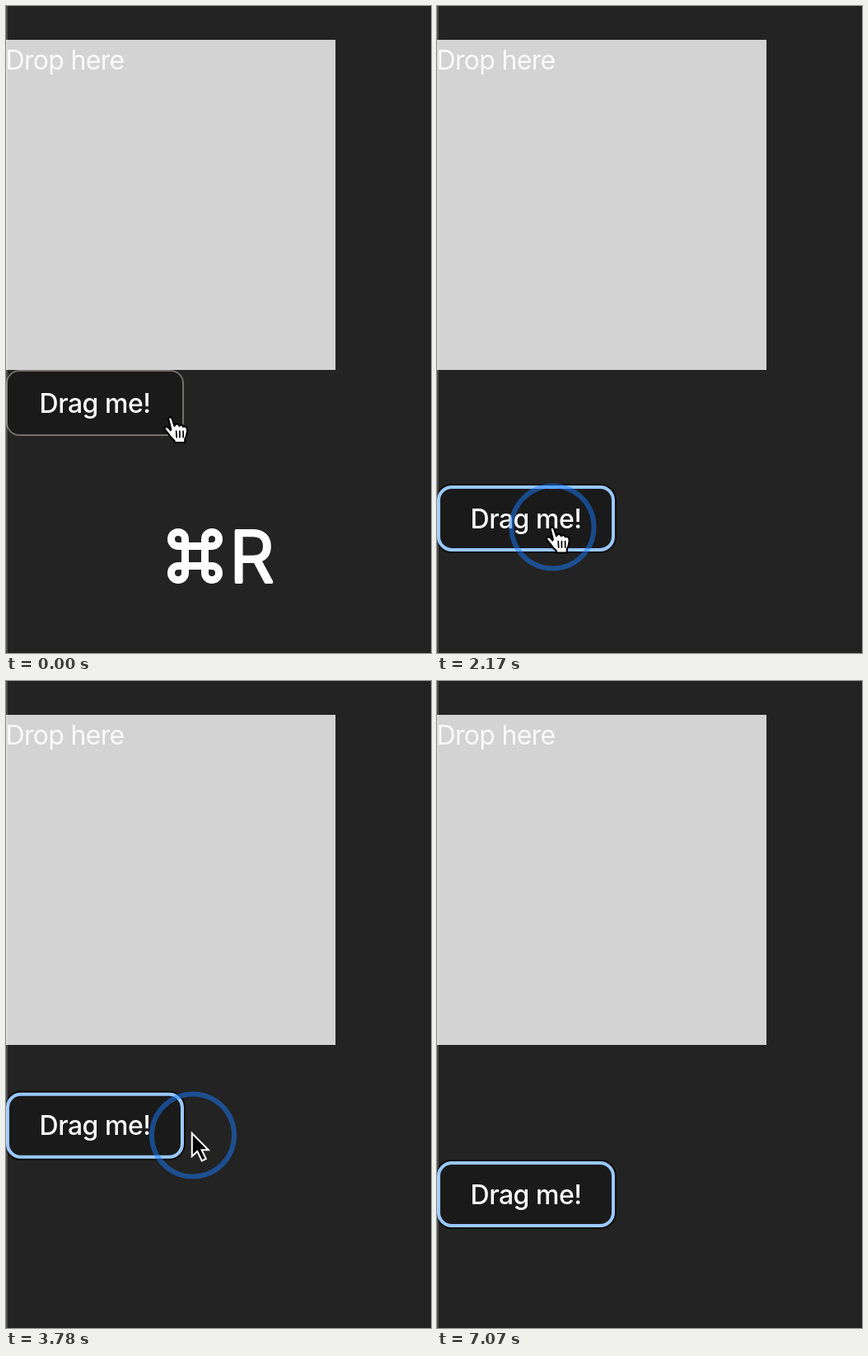
Recreate the animation shown at these times as an HTML page. Size 516x784 px, loop 7.21 s.

```html
<!DOCTYPE html>
<html lang="en">
<head>
<meta charset="utf-8">
<title>Drag and drop</title>
<style>
  html, body { margin: 0; height: 100%; overflow: hidden; background: #232323; }
  svg { display: block; }
  text { font-family: Inter, sans-serif; font-size: 32px; fill: #fff; }
</style>
</head>
<body>
<svg width="516" height="784" fill="none">
  <rect id="zone" y="41" width="400" height="400"/>
  <text x="-.4" y="77" letter-spacing="-.7" fill-opacity=".87">Drop here</text>

  <g id="button">
    <rect width="216" height="80" rx="16" fill="#1a1a1a"/>
    <rect id="border" x="1" y="1" width="214" height="78" rx="15" stroke="#74706b" stroke-width="2"/>
    <g id="focus">
      <rect x="-1" y="-1" width="218" height="82" rx="19" stroke="#0c0c0c" stroke-width="2"/>
      <rect x="2" y="2" width="212" height="76" rx="16" stroke="#99c8ff" stroke-width="4"/>
    </g>
    <text x="108" y="51.7" text-anchor="middle" letter-spacing="-.5" font-weight="500">Drag me!</text>
  </g>
  <rect width="2" height="784" fill="#fff" fill-opacity=".2"/>

  <g id="keys" stroke="#fff" stroke-linejoin="round">
    <path transform="translate(229.5 666.5)" stroke-width="9"
      d="M-12-12H-20.5A8.500 8.500 0 1 1-12-20.500V20.500A8.500 8.500 0 1 1-20.500 12H20.500A8.500 8.500 0 1 1 12 20.500V-20.500A8.500 8.500 0 1 1 20.500-12Z"/>
    <text x="271.5" y="698" style="font-size:85px" font-weight="300" stroke-width="4">R</text>
  </g>

  <g id="pointer">
    <circle id="ring" r="50" stroke="#187cfe" stroke-opacity=".5" stroke-width="6"/>
    <path id="arrow" d="M-1.200-2.500V25.500L5.300 19.500L10.800 31L15.800 28.500L10.600 17.800H18.800Z"
      fill="#000" stroke="#fff" stroke-width="2"/>
    <g id="hand" transform="translate(.3 .2) scale(1.06)"
      stroke="#000" stroke-linejoin="round" stroke-linecap="round">
      <path fill="#fff" stroke-width="2" d="M-3 2Q-2-1.500 1 1L4 10Q5 7 8 8Q9 8.500 9.500 10Q11 8 13.500 9.500L14 11Q16 10 18 12
        Q19 13 18.500 17Q18 22 16 25V29H4V27Q0 24-3 19L-7 14Q-8 11-5 11Q-3 11-.5 15L0 14Z"/>
      <path stroke-width="1.6" d="M6 16l.5 7M10 16v7M14 16v7"/>
    </g>
  </g>
</svg>
<script>
const LOOP = 7210, STEP = 70, PRESS = 770, RELEASE = 4760, HIDE = 6020;
const REST = 441, GRIP = 50, LAG = 12;

// turning points of the pointer: time, x, y
const path = [
  [0, 200, 498], [PRESS, 196, 491], [1330, 268, 647], [1540, 244.5, 608.5],
  [2170, 140.5, 631.5], [2275, 134, 643], [3010, 305, 481], [3150, 320, 462],
  [3780, 227, 550.5], [4130, 333, 600], [4340, 270, 647], [4480, 218, 642],
  [RELEASE, 194, 632], [LOOP, 194, 632]
];
const el = id => document.getElementById(id);
const clamp = v => Math.max(0, Math.min(1, v));
const show = (id, opacity) => el(id).setAttribute('opacity', opacity);
const move = (id, x, y) => el(id).setAttribute('transform', `translate(${x} ${y})`);

// zero where the pointer turns round, so the curve never overshoots
function slope(i, k) {
  const a = path[i - 1], b = path[i], c = path[i + 1];
  if (!a || !c || (b[k] - a[k]) * (c[k] - b[k]) <= 0) return 0;
  return (c[k] - a[k]) / (c[0] - a[0]);
}

function sample(t, k) {
  const i = path.findIndex(p => p[0] > t) - 1;
  const a = path[i], b = path[i + 1], d = b[0] - a[0], u = (t - a[0]) / d, v = 1 - u;
  return v * v * (1 + 2 * u) * a[k] + u * u * (1 + 2 * v) * b[k]
    + d * u * v * (v * slope(i, k) - u * slope(i + 1, k));
}

function draw(t) {
  const x = sample(t, 1), y = sample(t, 2), pressed = t >= PRESS;
  const top = pressed ? sample(t - LAG, 2) - GRIP : REST;
  const over = x < 216 && y > top && y < top + 80;
  el('zone').setAttribute('fill', top < REST - 3 ? '#90ee90' : '#d3d3d3');
  move('button', 0, top);
  move('pointer', x, y);
  show('focus', +pressed);
  show('border', +!pressed);
  show('keys', clamp(1 - t / 560));
  show('ring', clamp((t - PRESS + STEP) / 140) * clamp(1 - (t - RELEASE) / 280));
  show('hand', +over);
  show('arrow', +!over);
  show('pointer', clamp((HIDE - t) / 140));
}

function tick(now) {
  draw(Math.floor(now % LOOP / STEP) * STEP);
  requestAnimationFrame(tick);
}
draw(0);
requestAnimationFrame(tick);
</script>
</body>
</html>
```
